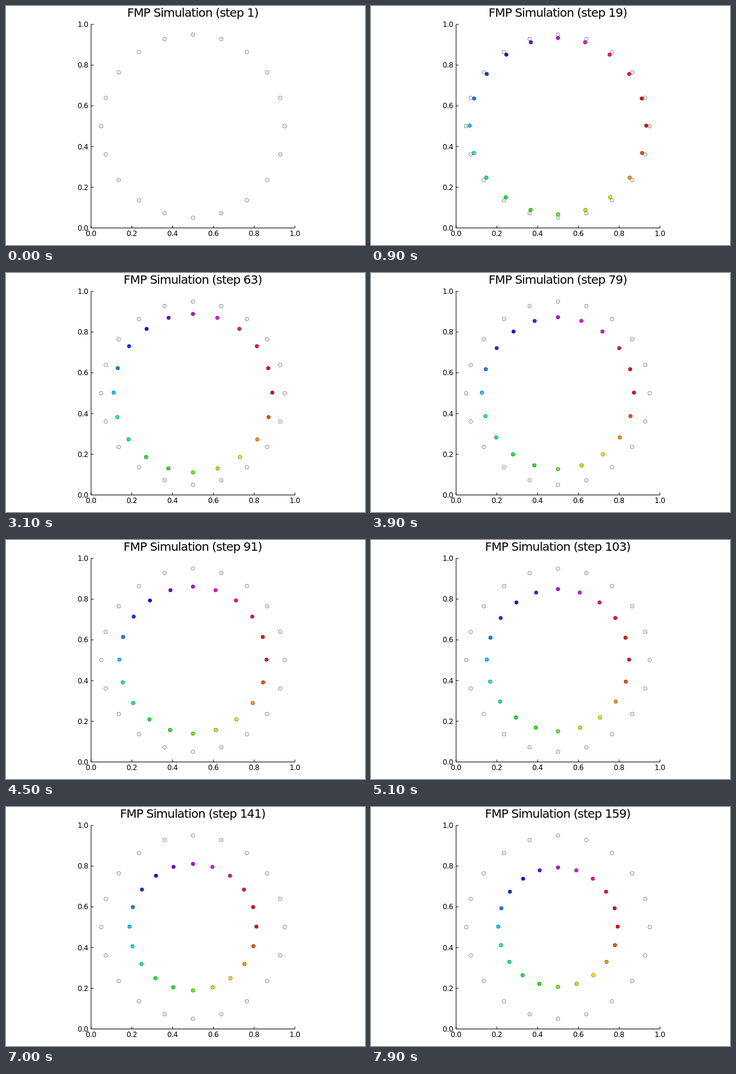
These frames come from a looping animation (600x400 px, 8 s). An HTML page:

```html
<!DOCTYPE html>
<html lang="en">
<head>
<meta charset="utf-8">
<title>FMP Simulation</title>
<style>
  html, body { margin: 0; width: 100%; height: 100%; overflow: hidden; background: #fff; }
  svg { display: block; }
  text { font: 12px "DejaVu Sans", sans-serif; letter-spacing: -.6px; }
  #title { font-size: 20px; letter-spacing: -.82px; text-anchor: middle; }
  circle { stroke: #000; stroke-width: .6; stroke-opacity: .8; }
  path { fill: none; stroke: #000; }
</style>
</head>
<body>
<svg id="stage" width="600" height="400" viewBox="0 0 600 400">
  <text id="title" x="312.1" y="18.3"></text>
</svg>
<script>
const COUNT = 20, SIZE = 340.7, LEFT = 142.2, BOTTOM = 371.5;
const CX = 312.5, CY = 201.1;
const FRAME = 100, LOOP = 8000;
const stage = document.getElementById('stage');
const title = document.getElementById('title');

function add(tag, attrs, text = '') {
  const el = document.createElementNS('http://www.w3.org/2000/svg', tag);
  for (const name in attrs) el.setAttribute(name, attrs[name]);
  el.textContent = text;
  return stage.appendChild(el);
}

// Axes with inward ticks
let axes = `M${LEFT} ${BOTTOM - SIZE}V${BOTTOM}H${LEFT + SIZE}`;
for (let i = 0; i <= 5; i++) {
  const x = LEFT + SIZE * i / 5, y = BOTTOM - SIZE * i / 5;
  const label = (i / 5).toFixed(1);
  axes += `M${x} ${BOTTOM}v-4M${LEFT} ${y}h4`;
  add('text', { x: x - .3, y: 385.3, 'text-anchor': 'middle' }, label);
  add('text', { x: 137, y: y + 4.4, 'text-anchor': 'end' }, label);
}
add('path', { d: axes });

// White rings mark the starting places; coloured agents run clockwise from the right
const angles = Array.from({ length: COUNT }, (_, i) => i * 2 * Math.PI / COUNT);
for (const a of angles) {
  add('circle', {
    cx: CX + .45 * SIZE * Math.cos(a),
    cy: CY + .45 * SIZE * Math.sin(a),
    r: 3, fill: '#fff'
  });
}
const agents = angles.map((_, i) =>
  add('circle', { r: 3, fill: `hsl(${360 * i / (COUNT - 1)} 100% 50%)` }));

function draw(now) {
  const step = 1 + 2 * Math.floor(now % LOOP / FRAME);
  const radius = SIZE * (.45 - .001 * (step - 2));
  const drift = .9 * Math.min(1, (step - 1) / 20);
  title.textContent = `FMP Simulation (step ${step})`;
  agents.forEach((agent, i) => {
    const cos = Math.cos(angles[i]), sin = Math.sin(angles[i]);
    const slide = drift * cos; // sideways shift along the ring, upward
    agent.setAttribute('cx', CX + radius * cos + slide * sin);
    agent.setAttribute('cy', CY + radius * sin - slide * cos);
    agent.setAttribute('visibility', step > 1 ? 'visible' : 'hidden');
  });
}

const start = performance.now();
function tick() {
  draw(performance.now() - start);
  requestAnimationFrame(tick);
}
tick();
</script>
</body>
</html>
```
